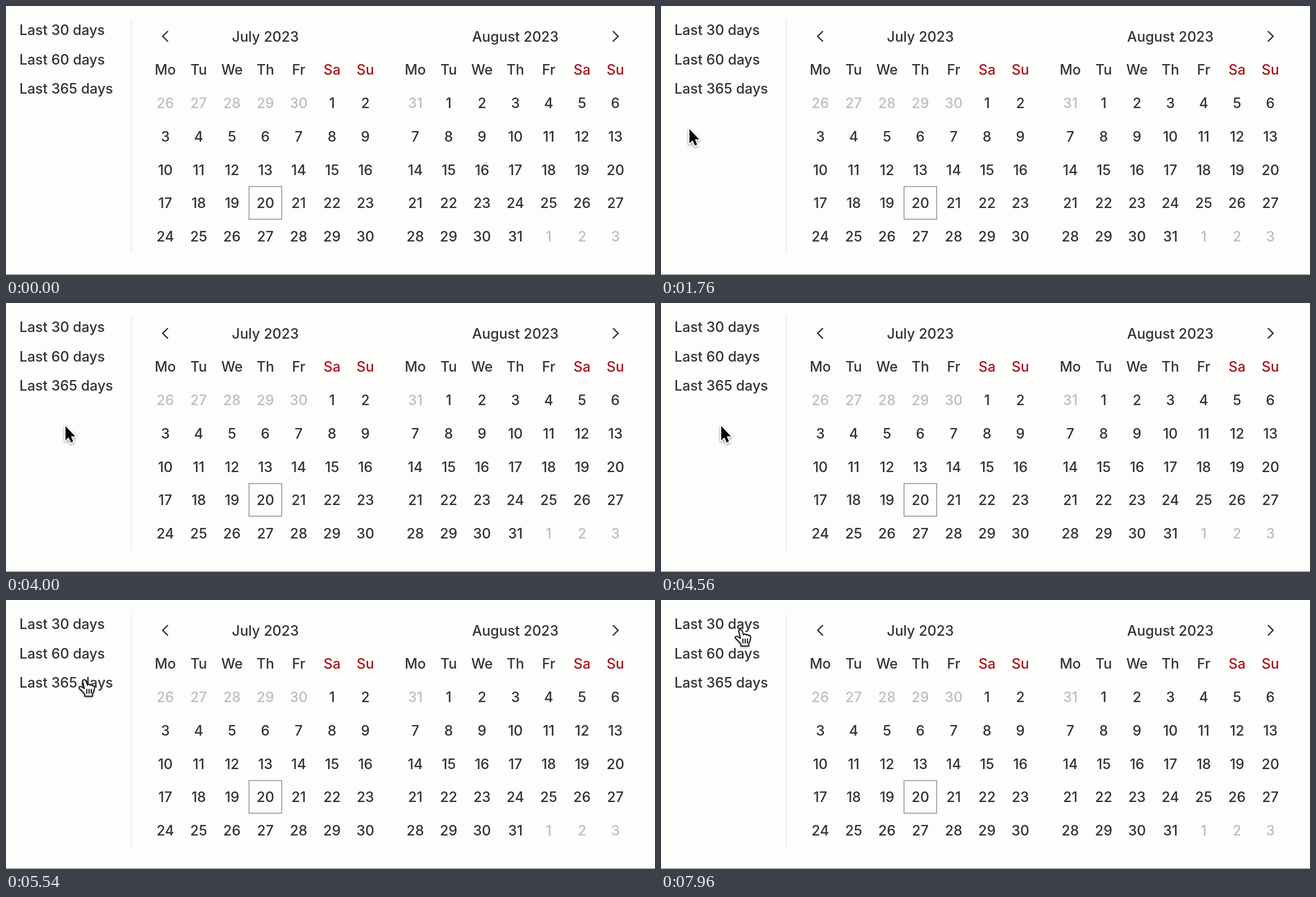
An HTML page with a canvas for the animation above (8000 ms loop, 1163 px wide and 482 px high).

```html
<!DOCTYPE html>
<html lang="en">
<head>
<meta charset="utf-8">
<title>Date range picker</title>
<style>
  html, body { margin: 0; width: 100%; height: 100%; overflow: hidden; background: #fdfdfc; }
  canvas { display: block; width: 1163px; height: 482px; }
</style>
</head>
<body>
<canvas id="stage" width="1163" height="482"></canvas>
<script>
const ctx = document.getElementById('stage').getContext('2d');
const LOOP = 8000;
const STEP = 59.75;
const INK = '#333237', RED = '#a91419', DIM = '#bebebd';

const PRESETS = [['Last 30 days', 43], ['Last 60 days', 95.5], ['Last 365 days', 148]];
const MONTHS = [
  { title: 'July 2023', x: 285.5, before: [26, 30], days: 30 },
  { title: 'August 2023', x: 733.5, before: [31, 31], days: 31 }
];

// Pointer waypoints: time, x, y of the tip.
const PATH = [
  [1200, -18, 108], [1760, 50, 219], [3420, 50, 219], [4060, 107, 219],
  [4660, 107, 219], [5300, 141, 142], [5600, 141, 142], [6080, 141, 57],
  [6240, 141, 57], [6440, 143, 52], [8000, 143, 52]
];

const arrow = new Path2D('M0 0V25.5L5.6 20.2L9.8 29.6L13.8 27.8L9.8 18.6H17.4Z');
const hand = new Path2D(
  'M-4.5 3C-5.5 -.5 -.5 -2.2 1 1.2L4.2 9.2C5.2 6.8 8.4 7 9 9.6' +
  'C10.2 7.6 12.8 8 13.2 10.6C14.8 9.2 17 10.6 16.6 13.4' +
  'C16.2 18 15.6 21.4 13.2 24V29H-.8V25.4C-3.8 22.4 -6 18.4 -10 15.8' +
  'C-13 13.4 -9.6 10.4 -6.8 12L-1.6 15.2Z');
const knuckles = new Path2D('M2.8 16.5V23.5M6.8 16.5V23.5M10.8 16.5V23.5');

function text(label, x, y, color = INK, align = 'center') {
  ctx.fillStyle = color;
  ctx.textAlign = align;
  ctx.fillText(label, x, y + 9.2);
}

function chevron(x, dir) {
  ctx.beginPath();
  ctx.moveTo(x - 4.7 * dir, 45);
  ctx.lineTo(x + 4.7 * dir, 54.3);
  ctx.lineTo(x - 4.7 * dir, 63.6);
  ctx.strokeStyle = INK;
  ctx.lineWidth = 2.4;
  ctx.stroke();
}

function drawMonth({ title, x, before, days }) {
  text(title, x + 3 * STEP, 54.3);
  ['Mo', 'Tu', 'We', 'Th', 'Fr', 'Sa', 'Su'].forEach((day, i) =>
    text(day, x + i * STEP, 114, i > 4 ? RED : INK));
  const lead = before[1] - before[0] + 1;
  for (let cell = 0; cell < 35; cell++) {
    const n = cell - lead + 1;
    const outside = n < 1 || n > days;
    const label = n < 1 ? before[0] + cell : n > days ? n - days : n;
    text(label, x + cell % 7 * STEP, 174 + Math.floor(cell / 7) * STEP, outside ? DIM : INK);
  }
}

function drawPicker() {
  ctx.fillStyle = '#fdfdfc';
  ctx.fillRect(0, 0, 1163, 482);
  ctx.fillStyle = '#dddce5';
  ctx.fillRect(224, 24, 1, 418);
  ctx.fillStyle = '#717173';
  ctx.fillRect(0, 481, 1163, 1);
  ctx.font = '500 25.1px Inter, sans-serif';
  PRESETS.forEach(([label, y]) => text(label, 24, y, INK, 'left'));
  chevron(285.5, -1);
  chevron(1092.2, 1);
  MONTHS.forEach(drawMonth);
  ctx.strokeStyle = '#8d8b98';
  ctx.lineWidth = 1.5;
  ctx.strokeRect(435.5, 323.5, 58.5, 58.5);
}

function pointerAt(time) {
  const next = PATH.findIndex(p => p[0] > time);
  if (next < 1) return null;
  const [t0, x0, y0] = PATH[next - 1], [t1, x1, y1] = PATH[next];
  const u = (time - t0) / (t1 - t0);
  const k = u * u * (3 - 2 * u);
  return [x0 + (x1 - x0) * k, y0 + (y1 - y0) * k];
}

function shadow(on) {
  ctx.shadowColor = on ? 'rgba(0,0,0,.4)' : 'transparent';
  ctx.shadowBlur = on ? 4 : 0;
  ctx.shadowOffsetY = on ? 2 : 0;
}

function drawPointer(x, y) {
  const overPreset = x > 22 && x < 196 && PRESETS.some(p => Math.abs(y - p[1]) < 13);
  ctx.save();
  ctx.translate(x + 1, y + 1.5);
  ctx.lineJoin = ctx.lineCap = 'round';
  shadow(true);
  if (overPreset) {
    ctx.fillStyle = '#fff';
    ctx.fill(hand);
    shadow(false);
    ctx.strokeStyle = '#111';
    ctx.lineWidth = 2;
    ctx.stroke(hand);
    ctx.stroke(knuckles);
  } else {
    ctx.strokeStyle = '#fff';
    ctx.lineWidth = 4;
    ctx.stroke(arrow);
    shadow(false);
    ctx.fillStyle = '#000';
    ctx.fill(arrow);
  }
  ctx.restore();
}

const start = performance.now();
function frame() {
  const time = (performance.now() - start) % LOOP;
  drawPicker();
  const pointer = pointerAt(time);
  if (pointer) drawPointer(...pointer);
  requestAnimationFrame(frame);
}
frame();
</script>
</body>
</html>
```
